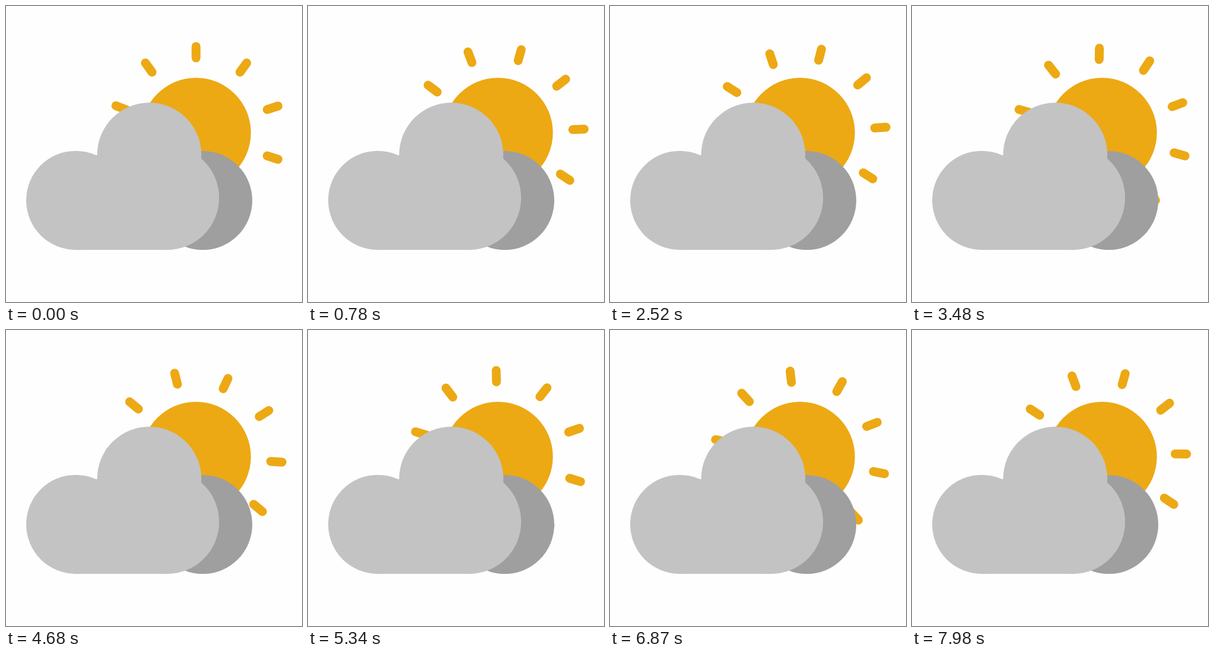
Recreate the animation shown at these times as an HTML page. Size 500x500 px, loop 8 s.

```html
<!DOCTYPE html>
<html lang="en">
<head>
<meta charset="utf-8">
<title>Sun behind a cloud</title>
<style>
  html, body { margin: 0; width: 100%; height: 100%; overflow: hidden; background: #fefefe; }
  svg { display: block; width: 100%; height: 100%; }
</style>
</head>
<body>
<svg viewBox="0 0 500 500">
  <g transform="translate(321 214)" fill="#eca914" stroke="#eca914">
    <circle r="92.7" stroke="none"/>
    <g id="rays" stroke-width="15" stroke-linecap="round"></g>
  </g>
  <circle cx="332.5" cy="328.5" r="83.5" fill="#9f9f9f"/>
  <g fill="#c3c3c3">
    <circle cx="117.7" cy="328.3" r="83.6"/>
    <circle cx="242" cy="251.3" r="88"/>
    <circle cx="272" cy="324" r="88"/>
    <rect x="117.7" y="252" width="154.3" height="159.9"/>
  </g>
</svg>
<script>
  const LOOP = 8000, STEP = 30, DEGREES_PER_MS = 0.02;
  const RAY_COUNT = 10, LOW_RAY = 8;
  const rays = document.getElementById("rays");

  for (let i = 0; i < RAY_COUNT; i++) {
    // One ray sits slightly closer to the sun and leans a little.
    const low = i === LOW_RAY;
    const angle = i * 360 / RAY_COUNT + (low ? 0.4 : 0);
    const ray = document.createElementNS("http://www.w3.org/2000/svg", "line");
    ray.setAttribute("y1", -9.6);
    ray.setAttribute("y2", 9.6);
    ray.setAttribute("transform",
      `rotate(${angle}) translate(0 ${low ? -133.2 : -136}) rotate(${low ? 3 : 0})`);
    rays.append(ray);
  }

  function draw() {
    const time = Math.floor(performance.now() % LOOP / STEP) * STEP;
    rays.setAttribute("transform", `rotate(${time * DEGREES_PER_MS})`);
    requestAnimationFrame(draw);
  }
  draw();
</script>
</body>
</html>
```
